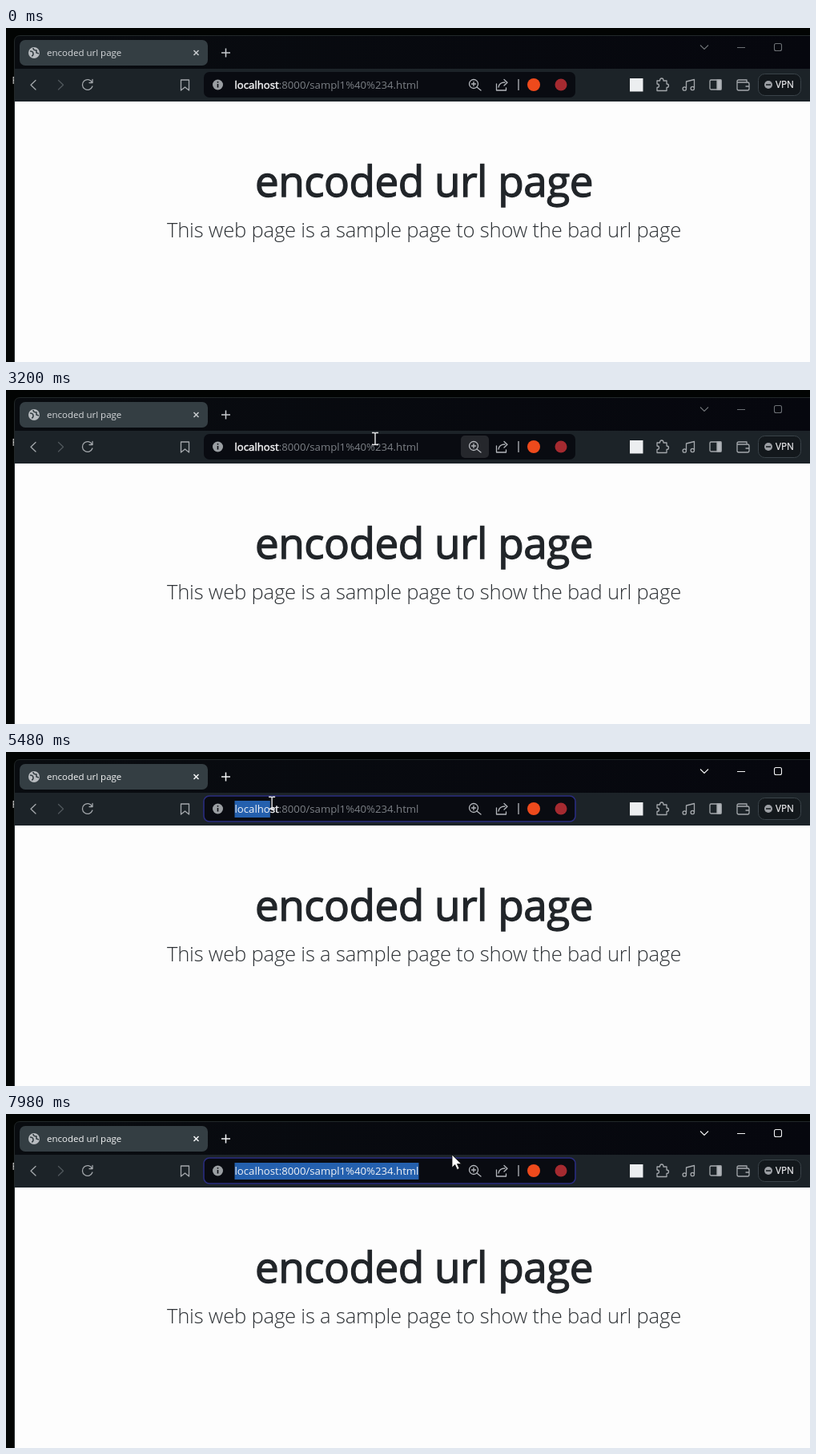
Recreate the animation shown at these times as an HTML page. Size 1004 px wide and 418 px high, loop 8000 ms.

```html
<!DOCTYPE html>
<html lang="en">
<head>
<meta charset="utf-8">
<title>encoded url page</title>
<style>
  html, body { margin: 0; width: 100%; height: 100%; overflow: hidden; background: #000; }
  svg { display: block; width: 1004px; height: 418px; }
  text { font-family: "Open Sans", "Noto Sans", sans-serif; white-space: pre; }
  .icon { fill: none; stroke: #a4a8ac; stroke-width: 1.3; stroke-linecap: round; stroke-linejoin: round; }
  .url { font-size: 13.2px; }
</style>
</head>
<body>
<svg viewBox="0 0 1004 418">
  <defs>
    <linearGradient id="strip">
      <stop offset="0" stop-color="#090c10"/><stop offset="1" stop-color="#06070e"/>
    </linearGradient>
    <clipPath id="selectionClip"><rect id="clipBox" x="285" y="58" height="26"/></clipPath>
  </defs>

  <!-- desktop behind the window -->
  <rect width="1004" height="418" fill="#020403"/>
  <text x="7.500" y="70" font-size="12" fill="#e0e0e0">F</text>
  <path d="M23 9.500h5m3 0h4m3 0h3m4 0h3" stroke="#88888a"/>

  <!-- window frame -->
  <path d="M11 418V17q0-7 7-7H1004V418Z" fill="url(#strip)"/>
  <path d="M10.500 418V17q0-7.500 7.500-7.500H1004" fill="none" stroke="#22282a"/>
  <rect x="11" y="51" width="993" height="41" fill="#1c2328"/>
  <rect x="11" y="92" width="993" height="326" fill="#fdfdfd"/>

  <!-- tab -->
  <rect x="17" y="15" width="235" height="32" rx="7" fill="#343e43"/>
  <circle cx="35" cy="31" r="7" fill="#b8bcc0"/>
  <path d="M30 29q4 0 4 3t-2 3M34 25q0 3 4 3v3l3 1" fill="none" stroke="#343e43" stroke-width="1.600"/>
  <text id="tabTitle" x="51" y="35" font-size="11.500">encoded url page</text>
  <path id="tabButtons" d="M234.500 28l6 6m0-6l-6 6M269 31h11M274.500 25.500v11" fill="none" stroke-width="1.500"/>
  <path id="windowButtons" d="M867 21.500l5 5 5-5M913 24.500h10M961.500 19.500h5q2 0 2 2v5q0 2-2 2h-5q-2 0-2-2v-5q0-2 2-2Z" fill="none" stroke-width="1.100"/>

  <!-- navigation -->
  <path class="icon" d="M37 65.500l-6 5.700 6 5.800"/>
  <path class="icon" d="M65.500 65.500l6 5.700-6 5.800" style="stroke:#50575c"/>
  <path class="icon" d="M107.500 68a6.400 6.400 0 1 0 .4 5M108 64.500v4h-4"/>
  <path class="icon" d="M218.500 65h10v13l-5-4-5 4Z"/>

  <!-- address bar -->
  <rect id="addressBar" x="247" y="55" width="464" height="32" rx="7" fill="#090b11"/>
  <rect id="zoomHover" x="568" y="57" width="35" height="28" rx="5" fill="#25272c"/>
  <circle cx="264.500" cy="71" r="6.500" fill="#9a9ea2"/>
  <path d="M264.500 70v4.500M264.500 67v1.600" stroke="#0a0c12" stroke-width="1.600"/>
  <text id="url" class="url" x="285.500" y="75.500" fill="#7c8086"><tspan fill="#f4f4f6" stroke="#f4f4f6" stroke-width=".5">localhost</tspan>:8000/sampl1%40%234.html</text>
  <rect id="selection" x="285.500" y="61" height="21" fill="#2460ae"/>
  <text class="url" x="285.500" y="75.500" fill="#f0f2f6" clip-path="url(#selectionClip)">localhost:8000/sampl1%40%234.html</text>
  <g class="icon" style="stroke:#b4b7bc">
    <circle cx="584" cy="70" r="5.500"/>
    <path d="M588 74l5 4M581.500 70h5M584 67.500v5"/>
    <path d="M612.500 70v8h12v-3M615 74q1-6 8-6M622 64.500l4 3.700-4 3.800"/>
    <path d="M640 64v14" stroke-linecap="butt"/>
  </g>
  <circle cx="659" cy="71" r="8" fill="#ee4a1c"/>
  <circle cx="693" cy="71" r="7.500" fill="#a52a30"/>

  <!-- toolbar -->
  <rect x="779" y="63" width="16.500" height="16.500" fill="#eceef0"/>
  <g class="icon">
    <path d="M813 66h3.500q0-3 2.300-3t2.200 3h4v4q2.500 0 2.500 2.200t-2.500 2.300v4h-12v-4q2.500 0 2.500-2.200t-2.500-2.300Z"/>
    <path d="M849.500 75v-8l10-2.500v10.500"/>
    <circle cx="847.300" cy="76" r="2.200"/><circle cx="857.300" cy="75.500" r="2.200"/>
    <rect x="879" y="65" width="14" height="12" rx="1.500"/>
    <rect x="888" y="65" width="5" height="12" fill="#b4b7bc"/>
    <path d="M914 68h12q2 0 2 2v6q0 2-2 2h-11q-2 0-2-2v-9q0-2 2-2h10v3M924 73h4"/>
  </g>
  <rect x="939.500" y="57.500" width="53" height="27" rx="8" fill="#13181c" stroke="#3a4349"/>
  <circle cx="952" cy="71" r="5" fill="#9c9fa4"/>
  <path d="M949 71h6" stroke="#13181c" stroke-width="1.500"/>
  <text x="961" y="75" font-size="11.800" fill="#f0f0f2" stroke="#f0f0f2" stroke-width=".2">VPN</text>

  <!-- page -->
  <g text-anchor="middle">
    <text x="522" y="210.500" font-size="53" letter-spacing="-.5" fill="#212529" stroke="#212529" stroke-width="1.300">encoded url page</text>
    <text x="522" y="262" font-size="25.600" font-weight="300" letter-spacing="-.2" fill="#2c3034">This web page is a sample page to show the bad url page</text>
  </g>

  <g id="pointer">
    <path id="beam" d="M-4-7.500h3l1 1 1-1h3M0-6.500v13M-4 7.500h3l1-1 1 1h3" fill="none" stroke-width="1.400"/>
    <path id="arrow" d="M0 0v16l3.700-3.500 2.700 6 2.700-1.200-2.700-5.800h5.200Z" fill="#fff" stroke="#111" stroke-width=".8"/>
  </g>
</svg>
<script>
const LOOP = 8000, FOCUS_AT = 5100, URL_X = 285.5;
const $ = id => document.getElementById(id);
const set = (id, name, value) => $(id).setAttribute(name, value);
const show = (id, on) => set(id, 'visibility', on ? 'visible' : 'hidden');

// time, x, y
const path = [
  [1650, 645, 434], [2120, 628, 224], [2550, 602, 130], [2850, 586, 72], [3060, 574, 66],
  [3200, 461, 61], [3700, 325, 64], [4300, 288, 65], [FOCUS_AT, 288, 65],
  [6140, 433, 61], [6900, 530, 60], [7500, 557, 51], [LOOP, 557, 51]
];

function pointerAt(t) {
  const i = path.findIndex(p => p[0] > t);
  if (i < 1) return null;
  const [t0, x0, y0] = path[i - 1], [t1, x1, y1] = path[i];
  const u = (t - t0) / (t1 - t0), k = u * u * (3 - 2 * u);
  return [x0 + (x1 - x0) * k, y0 + (y1 - y0) * k];
}

// Right edge of the last character the pointer has fully passed.
function selectionEnd(x) {
  const url = $('url');
  let end = URL_X;
  for (let i = 0; i < url.getNumberOfChars(); i++) {
    const edge = url.getEndPositionOfChar(i).x;
    if (edge > x) break;
    end = edge;
  }
  return end;
}

function render(t) {
  const focused = t >= FOCUS_AT;
  const pos = pointerAt(t);
  set('tabTitle', 'fill', focused ? '#f4f5f6' : '#d6d9dc');
  set('tabButtons', 'stroke', focused ? '#f4f5f6' : '#c8cbce');
  set('windowButtons', 'stroke', focused ? '#f0f1f2' : '#6c7074');
  set('addressBar', 'stroke', focused ? '#2a2c80' : 'none');
  set('addressBar', 'stroke-width', 1.6);
  set('zoomHover', 'opacity', Math.max(0, Math.min(1, (t - 2770) / 80, (3320 - t) / 100)));

  const width = focused ? selectionEnd(pos[0]) - URL_X : 0;
  set('selection', 'width', width);
  set('clipBox', 'width', width + .5);

  show('pointer', pos);
  show('beam', false);
  show('arrow', false);
  if (!pos) return;
  const [x, y] = pos;
  const overUrl = y > 55 && y < 87 && x > 280 && x < 568;
  const overText = overUrl || (y > 160 && y < 275 && x > 200 && x < 843);
  set('pointer', 'transform', `translate(${x.toFixed(1)} ${y.toFixed(1)})`);
  set('beam', 'stroke', y > 92 ? '#303236' : '#e8e8ea');
  show(overText ? 'beam' : 'arrow', true);
}

function frame(now) {
  render(now % LOOP);
  requestAnimationFrame(frame);
}
requestAnimationFrame(frame);
</script>
</body>
</html>
```
